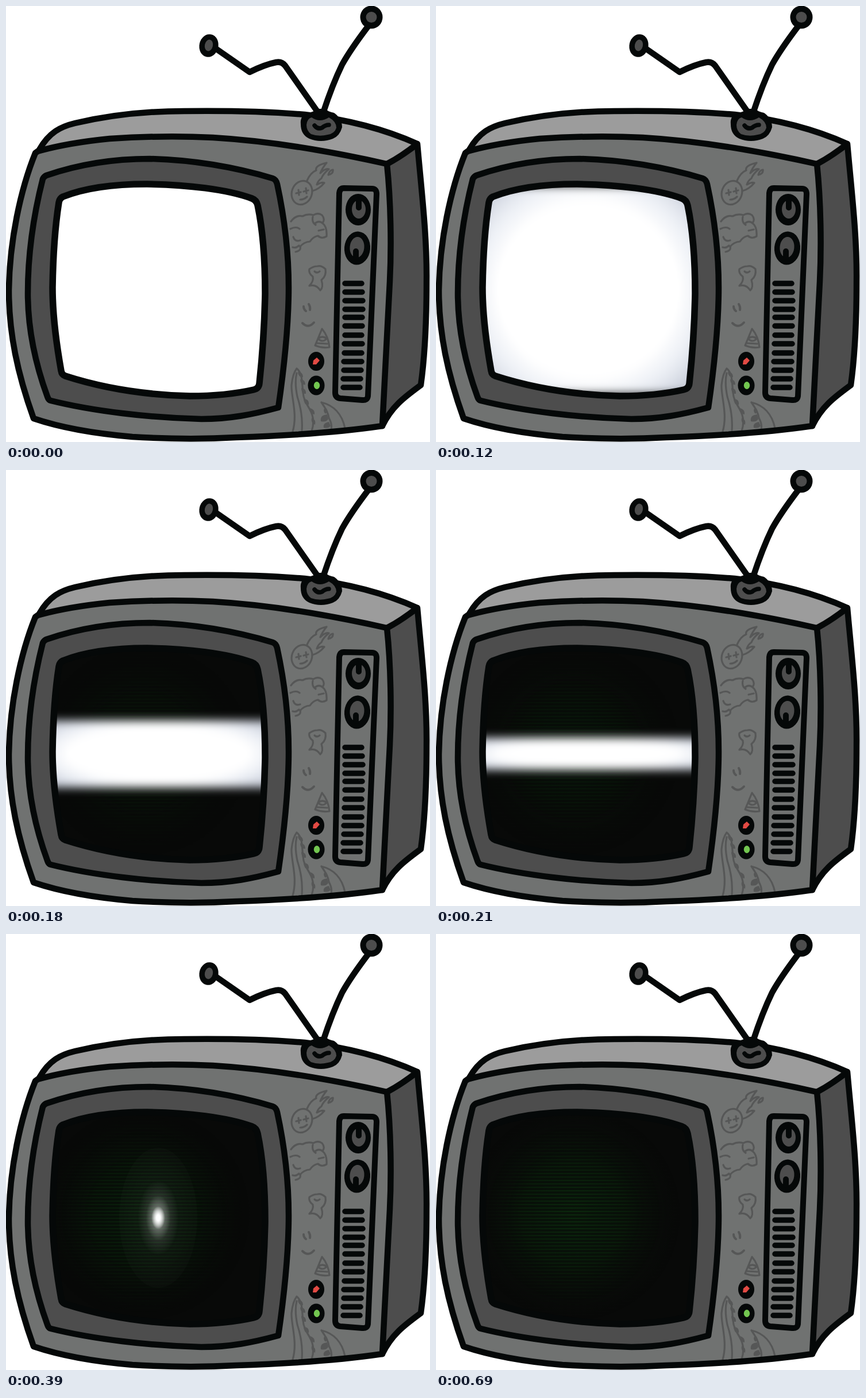
Animation, 738 px wide and 759 px high, one loop 0.72 s. Source, as an HTML page:

```html
<!DOCTYPE html>
<html lang="en">
<head>
<meta charset="utf-8">
<title>TV switching off</title>
<style>
html, body { margin: 0; width: 100%; height: 100%; overflow: hidden; background: #fff; }
svg { display: block; width: 100%; height: 100%; }
.ink { fill: none; stroke: #050808; stroke-width: 10.5; stroke-linecap: round; stroke-linejoin: round; }
.blob { fill: #050808; }
.doodle { fill: none; stroke: #565757; stroke-width: 3.2; stroke-linecap: round; stroke-linejoin: round; }
.dots { fill: #565757; stroke: none; }

/* one loop is 24 ticks of 30 ms */
.band, .tint, .line, .halo, .core, .haze, .scan { animation: 720ms infinite; }
.band { animation-name: band; }
.tint { animation-name: tint; }
.line { animation-name: line; }
.halo { animation-name: halo; }
.core { animation-name: core; }
.haze { animation-name: haze; }
.scan { animation-name: scan; }

@keyframes band {
  0% { transform: scale(1, 4.4); animation-timing-function: steps(4); }
  16.666% { transform: scale(1, 3.62); animation-timing-function: steps(1); }
  20.833% { transform: scale(1, 2.3); animation-timing-function: steps(1); }
  25% { transform: scale(1, 1.17); animation-timing-function: steps(1); }
  29.166% { transform: scale(1, .56); animation-timing-function: steps(1); }
  33.333% { transform: scale(.92, .2); animation-timing-function: steps(1); }
  37.5%, 100% { transform: scale(0, 0); animation-timing-function: steps(1); }
}
@keyframes tint {
  0% { opacity: 0; animation-timing-function: steps(4); }
  16.666%, 100% { opacity: 1; }
}
@keyframes line {
  0% { transform: scaleX(0); animation-timing-function: steps(1); }
  37.5% { transform: scaleX(1); animation-timing-function: steps(4); }
  54.166%, 100% { transform: scaleX(0); }
}
@keyframes halo {
  0% { transform: scale(0); animation-timing-function: steps(1); }
  37.5% { transform: scale(.62, .74); animation-timing-function: steps(4); }
  54.166% { transform: scale(1); animation-timing-function: steps(4); }
  70.833% { transform: scale(.56, .62); animation-timing-function: steps(1); }
  75% { transform: scale(.3, .28); animation-timing-function: steps(5); }
  95.833%, 100% { transform: scale(0); }
}
@keyframes core {
  0% { transform: scale(0); animation-timing-function: steps(1); }
  37.5% { transform: scale(.5); animation-timing-function: steps(4); }
  54.166% { transform: scale(1); animation-timing-function: steps(4); }
  70.833% { transform: scale(.6); animation-timing-function: steps(6); }
  95.833%, 100% { transform: scale(0); }
}
@keyframes haze {
  0%, 37.5% { opacity: 0; animation-timing-function: steps(4); }
  54.166% { opacity: 1; animation-timing-function: steps(5); }
  75%, 100% { opacity: 0; }
}
@keyframes scan {
  0%, 25% { opacity: .45; animation-timing-function: steps(3); }
  37.5% { opacity: .75; animation-timing-function: steps(9); }
  75%, 100% { opacity: 1; }
}
</style>
</head>
<body>
<svg viewBox="0 0 738 759" preserveAspectRatio="none">
  <defs>
    <path id="glass" d="M99 332C134 318 185 310 245 310C315 311 385 319 428 335Q436 338 438 347C447 390 451 440 451 500C450 560 446 610 441 657Q440 666 431 668C400 675 365 679 320 679C240 677 165 664 103 644Q97 642 96 635C88 590 81 540 81 490C82 430 86 380 92 342Q93 335 99 332Z"/>
    <path id="front" d="M55 253C90 243 130 236 180 231C240 227 300 226 360 229C460 235 570 254 663 275C670 340 671 420 668 480L655 731C580 742 490 748 400 751C330 755 270 753 220 750C150 744 95 734 48 718C20 640 5 570 5 495C6 410 25 320 51 256Z"/>
    <clipPath id="screen"><use href="#glass"/></clipPath>
    <filter id="soft" filterUnits="userSpaceOnUse" x="-200" y="-250" width="400" height="500" color-interpolation-filters="sRGB">
      <feGaussianBlur stdDeviation="0 8"/>
    </filter>
    <radialGradient id="edge" r=".64">
      <stop offset=".66" stop-color="#dfe4ee" stop-opacity="0"/>
      <stop offset=".8" stop-color="#e2e7f0" stop-opacity=".55"/>
      <stop offset="1" stop-color="#ccd1dc"/>
    </radialGradient>
    <linearGradient id="beam">
      <stop offset="0" stop-color="#fff" stop-opacity=".25"/>
      <stop offset=".12" stop-color="#fff" stop-opacity=".9"/>
      <stop offset=".88" stop-color="#fff" stop-opacity=".9"/>
      <stop offset="1" stop-color="#fff" stop-opacity=".25"/>
    </linearGradient>
    <radialGradient id="glow">
      <stop offset="0" stop-color="#fff" stop-opacity=".75"/>
      <stop offset=".3" stop-color="#fff" stop-opacity=".34"/>
      <stop offset=".6" stop-color="#fff" stop-opacity=".09"/>
      <stop offset="1" stop-color="#fff" stop-opacity="0"/>
    </radialGradient>
    <radialGradient id="spot">
      <stop offset=".25" stop-color="#fff"/>
      <stop offset="1" stop-color="#fff" stop-opacity="0"/>
    </radialGradient>
    <radialGradient id="mist">
      <stop offset="0" stop-color="#fff" stop-opacity=".05"/>
      <stop offset="1" stop-color="#fff" stop-opacity=".018"/>
    </radialGradient>
    <radialGradient id="green" gradientUnits="userSpaceOnUse" cx="240" cy="488" r="185">
      <stop offset="0" stop-color="#0b290d"/>
      <stop offset=".5" stop-color="#091c0a"/>
      <stop offset="1" stop-color="#080a08" stop-opacity="0"/>
    </radialGradient>
    <pattern id="rows" width="8" height="6" patternUnits="userSpaceOnUse">
      <rect width="8" height="6" fill="#555"/>
      <rect y="2" width="8" height="2" fill="#fff"/>
    </pattern>
    <mask id="lines"><rect x="70" y="300" width="390" height="390" fill="url(#rows)"/></mask>
  </defs>

  <!-- cabinet -->
  <path fill="#9c9c9c" d="M58 250C75 220 95 210 120 204C180 190 240 183 310 183C390 182 460 184 520 189C600 198 665 217 716 240L663 275C570 250 400 226 300 226C200 228 120 236 58 250Z"/>
  <path fill="#4d4d4d" d="M663 275Q688 262 716 240C723 320 733 400 732 480C732 550 729 610 722 660C695 680 672 696 655 731L668 480C671 410 670 340 663 275Z"/>
  <use href="#front" fill="#707271"/>

  <!-- doodles -->
  <g class="doodle">
    <ellipse cx="515" cy="325" rx="17.5" ry="21" transform="rotate(20 515 325)"/>
    <path d="M505 326l8-2M509 320l1 9M518 323l8-2M522 317l1 9M512 337q7 0 12-5M524 304Q530 290 540 286Q537 278 558 273Q550 283 547 291Q556 282 562 284Q552 292 549 300Q543 304 541 311Q550 306 554 308Q545 319 533 322M561 294Q563 286 569 285Q570 292 561 294"/>
    <path d="M496 375Q505 363 516 366Q525 361 535 364Q543 359 550 364Q556 371 551 378Q559 384 558 401Q549 406 543 400Q534 402 529 410Q518 411 512 419Q514 426 504 428M495 388Q505 383 511 388M500 402Q503 411 512 408M499 420q6 2 11-3M534 367q-2 10 5 14M537 379Q545 372 552 379M544 391l9-2"/>
    <path d="M528 458Q535 453 542 453Q549 451 556 458Q558 470 549 477Q553 490 547 495Q540 484 528 487Q536 479 534 471Q526 465 528 458ZM537 462q4 4 9 0"/>
    <path d="M518 523q0 5 4 8M527 519q3 5 2 10M516 552Q526 562 536 551" stroke-width="4"/>
    <path d="M550 562L538 591Q550 596 563 594Q561 575 550 562ZM543 579q8-6 15 0q-7 8-15 0M542 587l17 1"/>
    <path d="M499 741C508 710 496 680 497 660Q499 640 506 631C517 640 515 658 517 673C518 690 530 700 533 712Q537 725 532 740M506 639Q502 655 507 680Q517 710 515 739M549 690C570 695 585 710 590 735M549 690Q561 707 562 717Q568 728 566 737"/>
    <path class="dots" d="M508 637q9 0 9 9q-8 1-9-9M512 650q9 0 9 9q-8 2-9-9M514 665q9 1 8 10q-8 1-8-10M518 684q10 0 9 10q-8 2-9-10M529 700q9 2 8 11q-9-1-8-11M532 717q8 3 6 12q-8-3-6-12M556 699q-6 5 0 11q7-5 0-11M559 711q-13 1-11 12q9 2 13-4M562 724q-11 2-9 10q8 2 12-3"/>
  </g>

  <!-- bezel -->
  <path class="ink" style="fill:#4d4d4d" d="M70 295C122 277 185 266 250 266C330 268 400 281 464 300Q470 302 472 310C485 370 492 430 492 490C492 560 484 630 474 699C430 711 390 719 340 719C250 717 150 705 78 687Q74 686 72 680C50 620 38 560 38 500C38 430 49 360 64 301Q66 297 70 295Z"/>

  <!-- screen -->
  <g clip-path="url(#screen)">
    <rect x="70" y="300" width="390" height="390" fill="#080908"/>
    <rect class="scan" x="70" y="300" width="390" height="390" fill="url(#green)" mask="url(#lines)"/>
    <g transform="translate(265 494)">
      <ellipse class="haze" rx="68" ry="122" fill="url(#mist)"/>
      <ellipse class="halo" rx="36" ry="66" fill="url(#glow)"/>
      <rect class="line" x="-122" y="-1.2" width="245" height="3.4" rx="1.7" fill="url(#beam)"/>
      <ellipse class="core" rx="12" ry="20" fill="url(#spot)"/>
      <g filter="url(#soft)">
        <g class="band">
          <rect x="-185" y="-50" width="370" height="100" fill="#fff"/>
          <rect class="tint" x="-185" y="-50" width="370" height="100" fill="url(#edge)"/>
        </g>
      </g>
    </g>
  </g>
  <use href="#glass" class="ink" style="stroke-width:11.5"/>

  <!-- outlines -->
  <use href="#front" class="ink"/>
  <path class="ink" d="M58 250C75 220 95 210 120 204C180 190 240 183 310 183C390 182 460 184 520 189C600 198 665 217 716 240C723 320 733 400 732 480C732 550 729 610 722 660C695 680 672 696 655 731M663 275Q688 262 716 240"/>

  <!-- aerial -->
  <path class="ink" d="M365 74Q395 95 424 115Q450 102 470 98Q480 96 486 104L545 188M632 33Q600 75 585 102Q568 137 552 186"/>
  <g class="blob">
    <ellipse cx="353" cy="69" rx="16.5" ry="20" transform="rotate(12 353 69)"/>
    <ellipse cx="636" cy="19.5" rx="19.5" ry="20"/>
    <path d="M513 206Q511 191 526 186Q537 184 541 179L556 179Q560 184 571 186Q585 196 585 211Q581 226 569 231Q548 239 528 231Q513 224 513 206Z"/>
  </g>
  <g fill="#4d4d4d">
    <ellipse cx="353" cy="68.5" rx="7" ry="10" transform="rotate(12 353 68.5)"/>
    <ellipse cx="636" cy="19.5" rx="9.5" ry="9.5"/>
    <path d="M523 207Q524 196 532 194Q546 204 562 194Q575 201 575 212Q572 222 560 224Q545 228 531 223Q523 217 523 207Z"/>
  </g>
  <path class="ink" style="stroke-width:7.5" d="M537 208Q542 215 550 212Q556 207 562 207"/>

  <!-- controls -->
  <path class="ink" style="stroke-width:10" d="M588 317L637 318Q645 318 645 327L630 679Q629 687 620 686L582 683Q573 682 573 673L580 326Q581 317 588 317Z"/>
  <g class="blob">
    <ellipse cx="613" cy="354.5" rx="22" ry="27.5"/>
    <ellipse cx="611.5" cy="421.5" rx="22.5" ry="29" transform="rotate(5 611 421)"/>
    <ellipse cx="540" cy="618.5" rx="14" ry="16.5"/>
    <ellipse cx="540" cy="660.5" rx="14.5" ry="17"/>
  </g>
  <g fill="#4d4d4d">
    <ellipse cx="614" cy="354" rx="12" ry="16"/>
    <ellipse cx="611" cy="420" rx="12.5" ry="18" transform="rotate(5 611 420)"/>
  </g>
  <path class="ink" style="stroke-width:10" d="M614 338V351M609 427V437"/>
  <path fill="#e24a43" d="M535 617L541 612L546 617L540 624L534 624Z"/>
  <ellipse cx="541" cy="660.5" rx="5.2" ry="6.5" fill="#72c650"/>
  <path class="ink" style="stroke-width:9.5" d="M590 483h29M590 498h30M590 513h31M590 528h31M590 542h30M590 557h30M590 573h29M589 588h31M589 604h30M588 619h31M588 634h30M587 649h30M587 664h29"/>
</svg>
</body>
</html>
```
